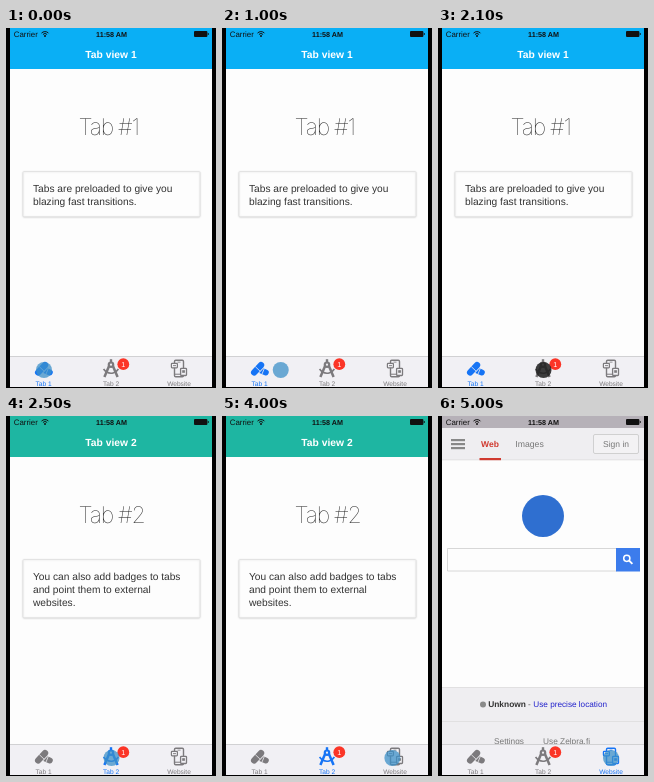
Recreate the animation shown at these times as an HTML page with a canvas. Size 210 by 360 pixels, loop 5100 ms.

```html
<!DOCTYPE html>
<html lang="en">
<head>
<meta charset="utf-8">
<title>Tab bar</title>
<style>
  html, body { margin: 0; width: 100%; height: 100%; overflow: hidden; background: #000; }
  canvas { display: block; width: 210px; height: 360px; }
</style>
</head>
<body>
<canvas id="stage"></canvas>
<script>
const W = 210, H = 360, LOOP = 5100;
const SANS = '"Liberation Sans", Arial, sans-serif';
const BLUE = '#1674f5', GREY = '#7c7a7d', BAR = '#f1f0f4', RED = '#d03a30';
const canvas = document.getElementById('stage');
const ratio = window.devicePixelRatio || 1;
canvas.width = W * ratio;
canvas.height = H * ratio;
const c = canvas.getContext('2d');
c.scale(ratio, ratio);
c.textRendering = 'geometricPrecision';

function rect(x, y, w, h, color) {
  c.fillStyle = color;
  c.fillRect(x, y, w, h);
}

function disc(x, y, r, color) {
  c.fillStyle = color;
  c.beginPath();
  c.arc(x, y, r, 0, Math.PI * 2);
  c.fill();
}

function arc(x, y, r, from, to, color, width) {
  c.strokeStyle = color;
  c.lineWidth = width;
  c.lineCap = 'butt';
  c.beginPath();
  c.arc(x, y, r, Math.PI * from, Math.PI * to);
  c.stroke();
}

function box(x, y, w, h, radius, fill, stroke, width = 1) {
  c.beginPath();
  c.roundRect(x, y, w, h, radius);
  if (fill) { c.fillStyle = fill; c.fill(); }
  if (stroke) { c.strokeStyle = stroke; c.lineWidth = width; c.stroke(); }
}

function line(points, color, width, cap = 'butt') {
  c.strokeStyle = color;
  c.lineWidth = width;
  c.lineCap = cap;
  c.beginPath();
  points.forEach(([x, y]) => c.lineTo(x, y));
  c.stroke();
}

function text(str, x, y, size, color,
  { weight = 400, align = 'left', family = SANS, tracking = 0 } = {}) {
  c.font = `${weight} ${size}px ${family}`;
  c.letterSpacing = `${tracking}px`;
  c.textAlign = align;
  c.fillStyle = color;
  c.fillText(str, x, y);
}

function statusBar() {
  text('Carrier', 7.7, 8.7, 7.9, '#111');
  text('11:58 AM', 105.5, 8.7, 7.2, '#111', { weight: 700, align: 'center' });
  for (const r of [2.8, 4.8]) arc(39, 8.4, r, -0.76, -0.24, '#111', 1);
  disc(39, 7.9, 1, '#111');
  box(188, 3, 13.4, 6, 1, '#111');
  rect(201.8, 5, 0.9, 2, '#111');
}

function tabPage(number, color, lines) {
  rect(4, 0, 202, 328, '#fdfdfd');
  rect(4, 0, 202, 41, color);
  text(`Tab view ${number}`, 105, 30, 10.3, '#fff', { weight: 700, align: 'center' });
  text(`Tab #${number}`, 72.5, 106.5, 23, '#222',
    { weight: 100, family: 'Inter, Roboto, sans-serif', tracking: -1.2 });
  c.save();
  c.shadowColor = 'rgba(0,0,0,.14)';
  c.shadowBlur = 2 * ratio;
  c.shadowOffsetY = 0.4 * ratio;
  box(17, 143.5, 177, 19.3 + 13 * lines.length, 1, '#fdfdfd', '#dedede', 0.7);
  c.restore();
  lines.forEach((s, i) => text(s, 27, 163.7 + 13 * i, 10.2, '#333'));
}

function searchPage() {
  rect(4, 0, 202, 328, '#fdfdfd');
  rect(4, 0, 202, 44, '#efeef1');
  rect(4, 0, 202, 12, '#b6b1b8');
  rect(4, 43.5, 202, 0.8, '#dedede');
  for (const y of [23, 27, 31]) rect(13, y, 14, 2.2, '#888');
  text('Web', 52, 31.3, 8.5, RED, { weight: 700, align: 'center' });
  rect(41.5, 42, 21.5, 2.2, RED);
  text('Images', 91.5, 31.3, 8.7, '#777', { align: 'center' });
  box(155.5, 18.5, 45, 19, 1.5, '#f3f2f4', '#c8c8c8', 0.8);
  text('Sign in', 178, 31, 8.5, '#777', { align: 'center' });

  disc(105, 100, 21, '#2f6fd0');

  box(9.5, 132.5, 169, 22.5, 0, '#fdfdfd', '#cfcfcf', 0.8);
  rect(178, 132, 24, 23.5, '#3c7cec');
  arc(188.8, 142.3, 3.1, 0, 2, '#fff', 1.5);
  line([[191.1, 144.6], [194.4, 147.9]], '#fff', 1.9);

  rect(4, 271, 202, 57, '#efeef1');
  rect(4, 271, 202, 0.8, '#dedede');
  rect(4, 305, 202, 0.8, '#dedede');
  disc(45, 288.5, 3, '#8a8a8a');
  text('Unknown', 50.2, 291.3, 8.4, '#333', { weight: 700 });
  text('-', 90, 291.3, 8.2, '#555');
  text('Use precise location', 95.3, 291.3, 8.2, '#2222cc');
  text('Settings', 56, 328, 8.3, '#777');
  text('Use Zelpra.fi', 105, 328, 8.3, '#777');
}

function pill(x1, y1, x2, y2, width, color) {
  const ends = [[x1, y1], [x2, y2]];
  line(ends, BAR, width + 1.6, 'round');
  line(ends, color, width, 'round');
  const mx = (x1 + x2) / 2, my = (y1 + y2) / 2;
  const len = Math.hypot(x2 - x1, y2 - y1);
  const nx = (y1 - y2) / len * width / 2, ny = (x2 - x1) / len * width / 2;
  line([[mx - nx, my - ny], [mx + nx, my + ny]], BAR, 0.8);
}

function pillsIcon(color) {
  pill(38.5, 342.2, 43.8, 344.4, 6, color);
  pill(32.2, 344.4, 39, 337.2, 6.4, color);
}

function compassIcon(color) {
  line([[105, 331.2], [105, 335]], color, 2.4);
  line([[103.5, 337], [98.4, 349]], color, 2.5);
  line([[106.5, 337], [111.6, 349]], color, 2.5);
  disc(105, 336.7, 3.3, color);
  disc(105, 336.7, 1.1, BAR);
  arc(105, 336.6, 8.6, 0.17, 0.83, color, 1.6);
}

function devicesIcon(color) {
  box(168.5, 332.2, 9, 16.6, 1.2, BAR, color, 1.4);
  rect(168.5, 345.7, 9, 1, color);
  rect(171.5, 333.7, 3, 0.8, color);
  box(165.4, 335.4, 6, 4.4, 0.7, BAR, color, 1.2);
  rect(167, 337.2, 3, 0.9, color);
  box(174.6, 340.3, 5.9, 7.2, 0.8, BAR, color, 1.3);
  rect(176.2, 342.2, 2.7, 2.6, color);
}

function tabBar(active) {
  rect(4, 328, 202, 31, BAR);
  rect(4, 328, 202, 0.7, '#c4c4c6');
  const tabs = [['Tab 1', 37.5, pillsIcon], ['Tab 2', 105, compassIcon], ['Website', 173, devicesIcon]];
  tabs.forEach(([label, x, icon], i) => {
    const color = i === active ? BLUE : GREY;
    icon(color);
    text(label, x, 357.6, 6.6, color, { align: 'center' });
  });
}

function badge() {
  disc(117.3, 336.2, 5.9, '#fb3527');
  text('1', 117.3, 338.8, 7.2, '#fff', { align: 'center' });
}

function glide(t, start, duration) {
  const p = Math.min(1, Math.max(0, (t - start) / duration));
  return p * p * (3 - 2 * p);
}

function pointer(t) {
  const x = 38 + 67.5 * glide(t, 780, 600) + 67.5 * glide(t, 3490, 580);
  const pressed = (t >= 2000 && t < 2300) || (t >= 4700 && t < 4900);
  disc(x, 342, 8, pressed ? 'rgba(28,28,28,.85)' : 'rgba(60,144,200,.75)');
}

function draw(t) {
  const active = t < 2300 ? 0 : t < 4900 ? 1 : 2;
  rect(0, 0, W, H, '#000');
  c.save();
  c.beginPath();
  c.rect(4, 0, 202, H);
  c.clip();
  if (active === 0) {
    tabPage(1, '#0aaff5', ['Tabs are preloaded to give you', 'blazing fast transitions.']);
  } else if (active === 1) {
    tabPage(2, '#1eb6a2', ['You can also add badges to tabs', 'and point them to external', 'websites.']);
  } else {
    searchPage();
  }
  statusBar();
  tabBar(active);
  badge();
  pointer(t);
  c.restore();
}

const start = performance.now();
function frame() {
  draw((performance.now() - start) % LOOP);
  requestAnimationFrame(frame);
}
frame();
</script>
</body>
</html>
```
